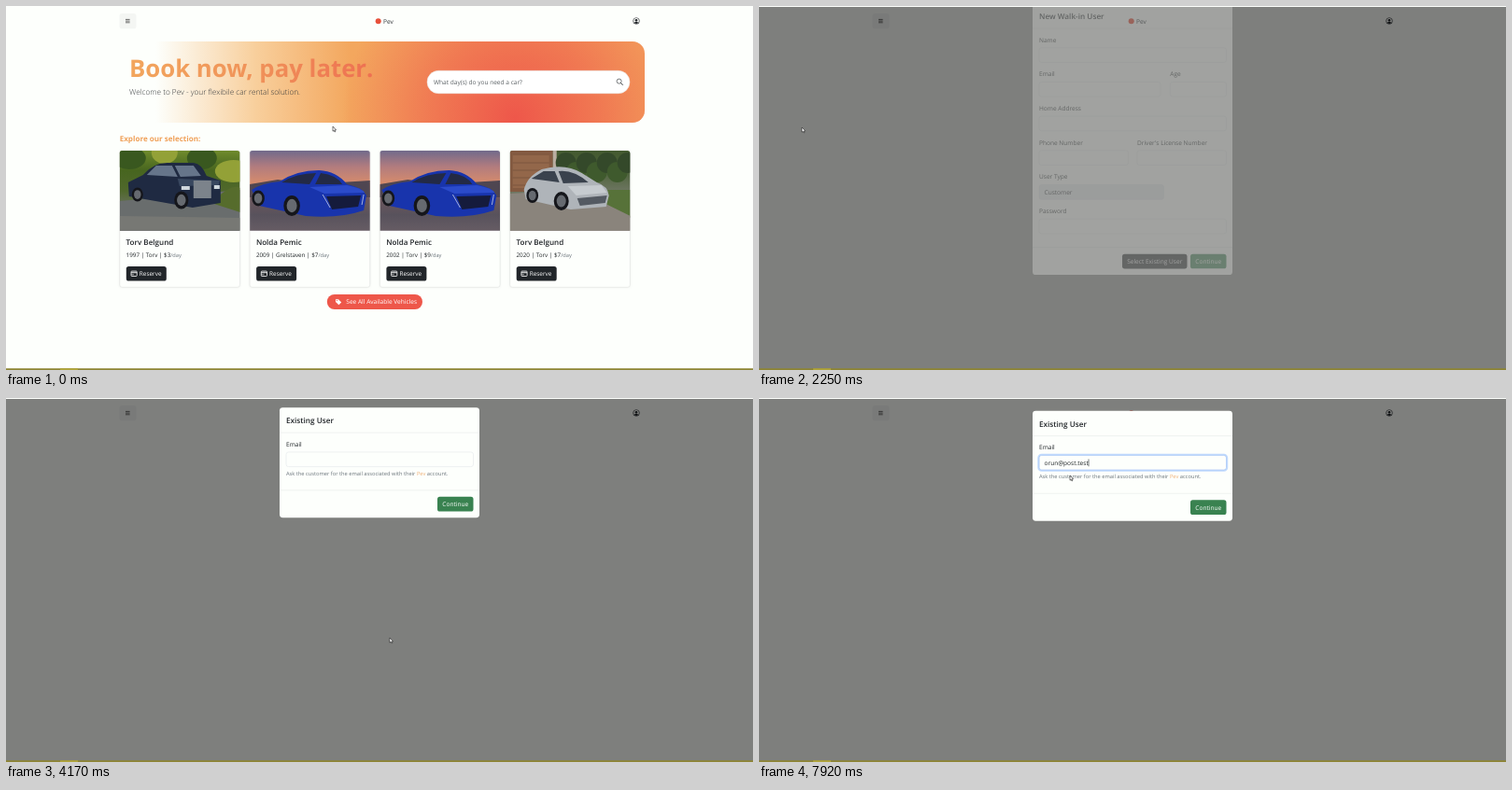
Recreate the animation shown at these times as an HTML page with a canvas. Size 800 px wide and 390 px high, loop 8 s.

```html
<!DOCTYPE html>
<html lang="en">
<head>
<meta charset="utf-8">
<title>Car rental walkthrough</title>
<style>
html, body { margin: 0; width: 100%; height: 100%; overflow: hidden; background: #fdfffc; }
canvas { display: block; width: 800px; height: 390px; }
</style>
</head>
<body>
<canvas id="stage"></canvas>
<script>
const W = 800, H = 390, LOOP = 8000;
const PAPER = '#fdfffc', INK = '#212529', MUTED = '#6c757d', LINE = '#e1e4e2', CORAL = '#ee574a';
const BRAND = 'Pev', EMAIL = 'orun@post.test';

// Moments of the walkthrough, in ms
const MENU_OPEN = 765, MENU_CLOSE = 1830, FORM_DIM = 2060, FORM_OPEN = 2210;
const SELECT_CLICK = 3824, LOOKUP_OPEN = 3974, FOCUS = 4840;
const KEYS = [5400, 5570, 5760, 5960, 6250, 6450, 6620, 6790, 6900, 7020, 7150, 7270, 7370, 7480];

const POINTER = [
  [0, 350, 129], [80, 350, 129], [690, 130, 24], [950, 130, 24], [1500, 48, 121], [1590, 48, 121],
  [1700, 46, 130], [2500, 46, 130], [3420, 424, 290], [3800, 425, 288], [3960, 425, 288],
  [4850, 326, 69], [7580, 326, 69], [7700, 333, 83], [LOOP, 333, 83]
];

const CARS = [
  ['Torv Belgund', '1997 | Torv | $3', forestPhoto],
  ['Nolda Pemic', '2009 | Grelstaven | $7', sunsetPhoto],
  ['Nolda Pemic', '2002 | Torv | $9', sunsetPhoto],
  ['Torv Belgund', '2020 | Torv | $7', drivewayPhoto]
];

const ratio = window.devicePixelRatio || 1;
function makeContext(canvas) {
  canvas.width = W * ratio;
  canvas.height = H * ratio;
  const context = canvas.getContext('2d');
  context.scale(ratio, ratio);
  context.textRendering = 'geometricPrecision';
  return context;
}
const stage = makeContext(document.getElementById('stage'));
const layer = makeContext(document.createElement('canvas'));
let ctx = stage;

const ramp = (t, start, length) => Math.min(1, Math.max(0, (t - start) / length));
const smooth = p => p * p * (3 - 2 * p);
const easeOut = p => 1 - (1 - p) ** 1.7;

function text(str, x, y, size, color = INK, weight = 400, align = 'left') {
  ctx.font = `${weight} ${size}px "Open Sans", "Noto Sans", sans-serif`;
  ctx.fillStyle = color;
  ctx.textAlign = align;
  ctx.fillText(str, x, y);
  return x + ctx.measureText(str).width;
}

function box(x, y, w, h, radius, fill, stroke, lineWidth = 0.5) {
  ctx.beginPath();
  ctx.roundRect(x, y, w, h, radius);
  if (fill) { ctx.fillStyle = fill; ctx.fill(); }
  if (stroke) { ctx.strokeStyle = stroke; ctx.lineWidth = lineWidth; ctx.stroke(); }
}

function rule(x1, y1, x2, y2, color = LINE, width = 0.5) {
  ctx.beginPath();
  ctx.moveTo(x1, y1);
  ctx.lineTo(x2, y2);
  ctx.strokeStyle = color;
  ctx.lineWidth = width;
  ctx.stroke();
}

function disc(x, y, r, fill, ry = r) {
  ctx.beginPath();
  ctx.ellipse(x, y, r, ry, 0, 0, 7);
  ctx.fillStyle = fill;
  ctx.fill();
}

function shape(path, fill, stroke, lineWidth = 0.7) {
  const p = new Path2D(path);
  if (fill) { ctx.fillStyle = fill; ctx.fill(p); }
  if (stroke) { ctx.strokeStyle = stroke; ctx.lineWidth = lineWidth; ctx.stroke(p); }
}

function at(x, y, paint) {
  ctx.save();
  ctx.translate(x, y);
  paint();
  ctx.restore();
}

function gradient(g, ...colors) {
  colors.forEach((c, i) => g.addColorStop(i / (colors.length - 1), c));
  return g;
}

function dim(alpha) {
  ctx.fillStyle = `rgba(0,0,0,${alpha * 0.5})`;
  ctx.fillRect(0, 1, W, H);
}

// Icons, drawn around their centre
const icons = {
  calendar(c) { box(-3.1, -2.7, 6.2, 5.4, 0.8, null, c, 0.8); rule(-3, -1.1, 3, -1.1, c, 0.9); rule(-3, 1, 0, 1, c, 0.6); },
  home(c) { shape('M-3.3 0L0 -3.2L3.3 0L2.4 .2V3H-2.4V.2Z', c); },
  car(c) { shape('M-3 2.6V0L-2 -2.3H2L3 0V2.6H2V1.7H-2V2.6Z', c); rule(-1.8, -0.6, 1.8, -0.6, PAPER, 0.9); },
  users(c) {
    for (const [x, r] of [[-1.5, 1.3], [1.6, 1.3]]) { disc(x, -1.4, r, c); shape(`M${x - 2} 2.4Q${x} -1.6 ${x + 2} 2.4Z`, c); }
  },
  walk(c) { disc(0.3, -2.6, 0.9, c); shape('M0 -1.3V1L-1.3 3.2M0 1L1.3 3.2M-1.6 .4L-.9 -1L.3 -1.1L1.7 .2', null, c, 0.9); },
  tag(c) { shape('M-3 -2.8H0L3.2 .4L.4 3.2L-3 0Z', c); disc(-1.6, -1.4, 0.6, CORAL); },
  search(c) {
    ctx.beginPath();
    ctx.arc(-0.7, -0.7, 2.5, 0, 7);
    ctx.strokeStyle = c;
    ctx.lineWidth = 0.6;
    ctx.stroke();
    rule(1.1, 1.1, 3.4, 3.4, c, 0.9);
  },
  account(c) {
    disc(0, 0, 3.5, c);
    disc(0, 0, 2.9, PAPER);
    disc(0, -0.8, 1.3, c);
    shape('M-2.3 2.1Q0 -.4 2.3 2.1Q0 3.8 -2.3 2.1Z', c);
  }
};
const icon = (name, x, y, color = INK) => at(x, y, () => icons[name](color));

function wheel(x, y, r) {
  disc(x, y, r * 0.8, '#15161b', r);
  disc(x, y, r * 0.5, '#666a70', r * 0.65);
}

function backdropFill(...colors) {
  ctx.fillStyle = gradient(ctx.createLinearGradient(0, 0, 0, 86), ...colors);
  ctx.fillRect(0, 0, 129, 86);
}

function forestPhoto() {
  backdropFill('#6f8a2c', '#47651f', '#50682c', '#6e726a', '#74766f');
  [[10, 8, 18], [48, 2, 14], [88, 8, 16], [122, 22, 20]].forEach(([x, y, r], i) => disc(x, y, r, i % 2 ? '#93a137' : '#39581f', 12));
  shape('M0 54L129 42V86H0Z', '#696d6d');
  shape('M0 70L129 72V86H0Z', '#777874');
  shape('M98 56Q120 34 129 40V66Z', '#566c2c');
  shape('M9 34L25 26Q36 13 51 13H79Q88 14 93 27L108 32V56L78 61L10 49Z', '#1f2a42');
  shape('M29 26L39 16L56 16L62 28Z M65 28L59 16H79L87 27Z', '#66758a');
  shape('M62 30L107 32L106 37L64 38Z', '#38475f');
  shape('M79 32H98V51H79Z', '#7c838b');
  shape('M66 38H75V42H66Z M101 37H107V41H101Z', '#cfd7dd');
  wheel(19, 47, 7.5);
  wheel(66, 53, 9.5);
}

function sunsetPhoto() {
  backdropFill('#716a8b', '#b27c7e', '#d58b6c', '#6b565c', '#58525c', '#665c64');
  shape('M0 36L30 31L64 36L129 32V50H0Z', '#4f4651');
  shape('M2 42Q12 35 32 33Q50 21 74 21Q93 22 104 36Q120 39 125 48L122 64Q96 73 60 70L10 59Z', '#1834ac');
  shape('M34 34Q50 24 71 24L64 36Z M70 36L76 24Q93 26 99 36Z', '#232a45');
  shape('M64 39L104 37Q120 40 123 45L80 46Z', '#2b4bcb');
  shape('M82 49L119 48L116 60L88 63Z', '#151b3c');
  rule(78, 47, 86, 61, '#c8d0e8', 0.8);
  rule(122, 47, 120, 58, '#c8d0e8', 0.8);
  wheel(9, 51, 8.5);
  wheel(45, 59, 11);
}

function drivewayPhoto() {
  backdropFill('#43592f', '#4d633a', '#6c7560', '#878279', '#85807a');
  shape('M0 0H46V44H0Z', '#835a41');
  shape('M3 5H42V40H3Z', '#93674a');
  for (let y = 13; y < 38; y += 8) rule(3, y, 42, y, '#71503b', 0.7);
  shape('M46 0H50V45H46Z', '#b9ada0');
  for (let i = 0; i < 7; i++) disc(60 + i * 11, 13 + i % 2 * 10, 11, i % 2 ? '#3f5a2d' : '#34492a');
  shape('M72 42H129V72L104 58Z', '#577239');
  shape('M0 46L72 42L129 70V86H0Z', '#8a847c');
  shape('M15 42Q18 28 34 20Q59 13 77 24L93 34Q105 38 106 48L103 60L65 63L17 52Z', '#afb4b9');
  shape('M23 30L36 22H48L53 34Z M52 22Q68 20 84 34L57 35Z', '#3a424d');
  shape('M62 38L98 37L104 45L71 48Z', '#c6cbcf');
  shape('M72 51L104 48L102 56L75 59Z', '#545a62');
  wheel(24, 48, 8);
  wheel(55, 54, 10);
}

function navbar(hovered) {
  box(121.5, 8, 18, 16.3, 2.6, hovered ? '#c3c5c2' : '#f4f6f3');
  for (const y of [14.4, 16.1, 17.8]) rule(128, y, 132.6, y, '#333', 0.7);
  disc(398.7, 16.2, 3, '#e8503a');
  text(BRAND, 404, 18.7, 6.57, '#33373a');
  icon('account', 675, 16);
}

function hero() {
  const wash = ctx.createLinearGradient(121, 0, 684, 0);
  [[0, PAPER], [0.07, PAPER], [0.26, '#f8cf9c'], [0.44, '#f3a75e'], [1, '#f3a25c']].forEach(s => wash.addColorStop(...s));
  box(121, 38, 563, 87, [0, 13, 13, 0], wash);
  box(121, 38, 563, 87, [0, 13, 13, 0],
    gradient(ctx.createRadialGradient(545, 120, 0, 545, 120, 185), CORAL, 'rgba(238,87,74,.55)', 'rgba(238,87,74,0)'));
  const lettering = gradient(ctx.createLinearGradient(132, 0, 395, 0), '#f2a65e', '#f09359', '#ee6f51');
  text('Book now, pay later.', 132, 75.6, 25.75, lettering, 700);
  text(`Welcome to ${BRAND} - your flexibile car rental solution.`, 132, 94.5, 8.23, '#33373a', 300);
  box(451, 69.3, 217, 24.4, 12.2, '#fff', '#e4e0dc');
  text('What day(s) do you need a car?', 458, 83.8, 6.57, '#5c6266');
  icon('search', 657.3, 81.3);
}

function carCard([title, details, photo], x) {
  ctx.save();
  ctx.shadowColor = 'rgba(0,0,0,.12)';
  ctx.shadowBlur = 2 * ratio;
  box(x, 155, 128.6, 146.3, 2.6, PAPER);
  ctx.restore();
  box(x, 155, 128.6, 146.3, 2.6, null, '#dfe1de');
  ctx.save();
  ctx.beginPath();
  ctx.roundRect(x, 155, 128.6, 85.8, [2.6, 2.6, 0, 0]);
  ctx.clip();
  at(x, 155, photo);
  ctx.restore();
  text(title, x + 6.8, 256.4, 8.05, INK, 600);
  const end = text(details, x + 6.8, 269.4, 6.3);
  text('/day', end, 269.4, 5.7, MUTED);
  box(x + 7, 279, 43, 15.6, 2.6, INK);
  icon('calendar', x + 15.3, 286.8, '#fff');
  text('Reserve', x + 21, 289.2, 6.45, '#fff');
}

function home() {
  hero();
  text('Explore our selection:', 121.7, 144.8, 8.05, '#f0a058', 700);
  CARS.forEach((car, i) => carCard(car, 121.8 + i * 139.3));
  box(343.8, 309, 102.2, 16, 8, CORAL);
  icon('tag', 356, 317, '#fff');
  text('See All Available Vehicles', 364.3, 319.4, 6.57, '#fff');
}

function sideMenu(x, hoveredRow) {
  at(x, 0, () => {
    ctx.fillStyle = PAPER;
    ctx.fillRect(0, 1, 171.5, H);
    text('Menu', 7, 18, 8.2, INK, 600);
    rule(158, 11.5, 164.3, 17.8, '#444', 0.8);
    rule(164.3, 11.5, 158, 17.8, '#444', 0.8);
    const rows = [['home', 'Home'], ['car', 'Vehicles Catalogue'], ['calendar', 'My Reservations'],
      ['users', 'All Users'], ['calendar', 'All Reservations'], ['walk', 'Walk-in']];
    rows.forEach(([symbol, label], i) => {
      const y = 43.5 + i * 17.5;
      if (i === hoveredRow) box(7, y - 8.7, 158, 17.5, 0, '#f3f5f2');
      icon(symbol, 20.5, y);
      text(label, 29, y + 2.4, 6.57);
      if (i < 5) rule(7, y + 8.75, 165, y + 8.75);
    });
  });
}

function button(label, x, y, w, fill) {
  box(x, y, w, 15.7, 2.6, fill);
  text(label, x + w / 2, y + 10.2, 6.57, '#fff', 400, 'center');
}

function modalFrame(title, height) {
  box(293, 13.7, 214, height, 3.4, PAPER);
  text(title, 300, 30.7, 8.2, INK, 600);
  rule(293, 40.6, 507, 40.6);
  const footer = 13.7 + height - 29.4;
  rule(293, footer, 507, footer);
  button('Continue', 462, footer + 7, 38.5, '#398250');
}

function field(label, row, x, w, fill = PAPER) {
  const y = row * 36.7;
  text(label, x, y + 55.3, 6.57);
  box(x, y + 61.4, w, 15.7, 2.6, fill, '#dee2e6');
}

function walkInForm(t) {
  modalFrame('New Walk-in User', 291);
  field('Name', 0, 300, 200.5);
  field('Email', 1, 300, 130);
  field('Age', 1, 440.3, 60.2);
  field('Home Address', 2, 300, 200.5);
  field('Phone Number', 3, 300, 95.5);
  field("Driver's License Number", 3, 405, 95.5);
  field('User Type', 4, 300, 133.5, '#e9ecef');
  text('Customer', 305.5, 218.7, 6.57);
  field('Password', 5, 300, 200.5);
  button('Select Existing User', 389, 282.4, 69.5, t > 3330 ? '#424649' : INK);
}

function lookupForm(t) {
  modalFrame('Existing User', 118);
  const focus = ramp(t, FOCUS, 150);
  box(299.2, 60.6, 202.1, 17.3, 3.4, null, `rgba(13,110,253,${0.25 * focus})`, 1.8);
  field('Email', 0, 300, 200.5);
  box(300, 61.4, 200.5, 15.7, 2.6, null, `rgba(134,183,254,${focus})`);
  const typed = KEYS.filter(k => k <= t).length;
  const end = text(EMAIL.slice(0, typed), 305.5, 71.7, 6.57);
  const lastInput = typed ? KEYS[typed - 1] : FOCUS;
  if (t > FOCUS && (t - lastInput) % 1060 < 530) rule(end + 0.3, 65.5, end + 0.3, 73.3, INK, 0.6);
  let x = text('Ask the customer for the email associated with their ', 300, 86, 5.72, MUTED);
  x = text(BRAND, x, 86, 5.72, '#efb078');
  text(' account.', x, 86, 5.72, MUTED);
}

// Slides and fades a dialog as one group
function dialog(t, paint, open, close = Infinity) {
  const alpha = ramp(t, open, 150) - ramp(t, close, 150);
  if (alpha <= 0) return;
  const lift = 1 - easeOut(ramp(t, open, 300)) + easeOut(ramp(t, close, 300));
  ctx = layer;
  ctx.clearRect(0, 0, W, H);
  at(0, -21.4 * lift, () => paint(t));
  ctx = stage;
  ctx.globalAlpha = alpha;
  ctx.drawImage(layer.canvas, 0, 0, W, H);
  ctx.globalAlpha = 1;
}

function pointerAt(t) {
  const i = Math.max(1, POINTER.findIndex(k => k[0] > t));
  const [t0, x0, y0] = POINTER[i - 1], [t1, x1, y1] = POINTER[i];
  const p = smooth(ramp(t, t0, t1 - t0));
  return [x0 + (x1 - x0) * p, y0 + (y1 - y0) * p];
}

function cursor(kind, x, y) {
  at(x, y, () => {
    if (kind === 'hand') shape('M-.7 .3Q0 -.5 .6 .3V2.6L3 3.3V5.3L2 7H-.8L-2.5 4.4L-1.8 3.8L-.7 4.5Z', '#fff', '#222', 0.6);
    else if (kind === 'beam') shape('M-1 -1.3H1M0 -1.3V4.2M-1 4.2H1', null, '#222', 0.7);
    else shape('M0 0V5.2L1.2 4.2L2 6L2.8 5.6L2 3.9H3.6Z', '#fff', '#222', 0.6);
  });
}

function draw(t) {
  const [x, y] = pointerAt(t);
  const overBurger = t < MENU_OPEN + 60 && x < 140 && y < 25;
  const inMenu = t > MENU_OPEN + 250 && t < MENU_CLOSE && x > 7 && x < 165;
  const row = inMenu ? Math.floor((y - 34.8) / 17.5) : -1;

  ctx.fillStyle = PAPER;
  ctx.fillRect(0, 0, W, H);
  navbar(overBurger);
  if (t < MENU_CLOSE) home();

  dim(ramp(t, MENU_OPEN, 150) - ramp(t, MENU_CLOSE, 150));
  const shown = smooth(ramp(t, MENU_OPEN, 300)) - smooth(ramp(t, MENU_CLOSE, 300));
  if (shown > 0) sideMenu(-171.5 * (1 - shown), row);

  dim(ramp(t, FORM_DIM, 150) - ramp(t, LOOKUP_OPEN, 150));
  dim(ramp(t, SELECT_CLICK, 150));
  dialog(t, walkInForm, FORM_OPEN, SELECT_CLICK);
  dialog(t, lookupForm, LOOKUP_OPEN);

  box(0, 388.3, W, 1.7, 0, '#8d8433');
  box(58, 388.3, 19, 1.7, 0, '#b0a53a');

  const hand = overBurger || row >= 0 || (t > 3330 && t < LOOKUP_OPEN);
  const beam = t > 4720 && t < 7620;
  cursor(hand ? 'hand' : beam ? 'beam' : 'arrow', x, y);
}

function tick() {
  draw(performance.now() % LOOP);
  requestAnimationFrame(tick);
}
tick();
</script>
</body>
</html>
```
